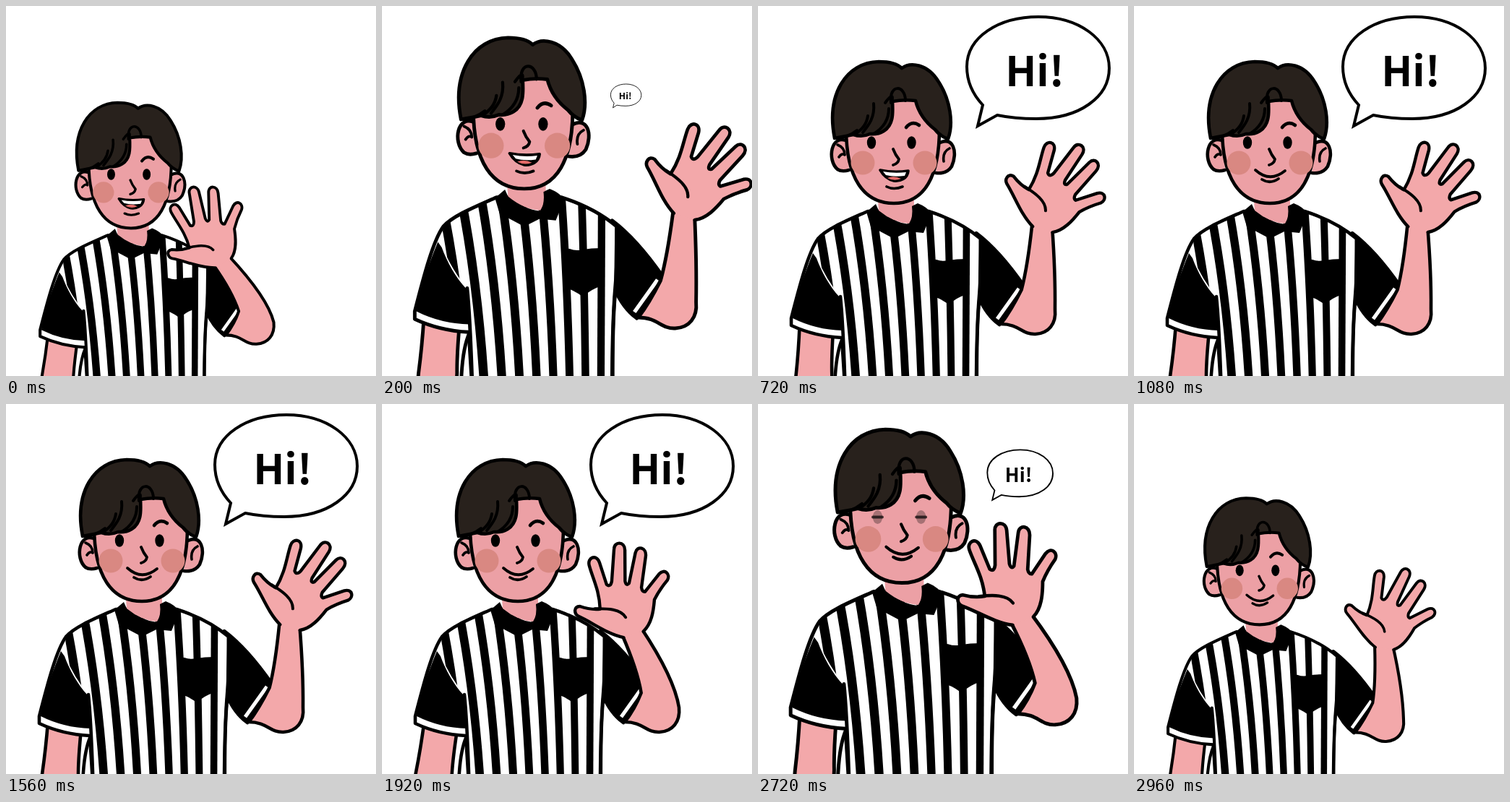
Animation, 512 px wide and 512 px high, one loop 3 s. Source, as an HTML page:

```html
<!DOCTYPE html>
<html lang="en">
<head>
<meta charset="utf-8">
<title>Waving referee</title>
<style>
html, body { margin: 0; width: 100%; height: 100%; overflow: hidden; background: #fff; }
svg { display: block; width: 100vw; height: 100vh; }
.line { fill: none; }
.skin { fill: #f3a8aa; }
.face { fill: #eca0a5; }
.hair { fill: #28211c; }
.white { fill: #fff; }
.ink { fill: #000; }
.bare { stroke: none; }
text { font: 700 57px "Noto Sans CJK KR", "Noto Sans CJK JP", "Noto Sans", sans-serif; text-anchor: middle; }
</style>
</head>
<body>
<svg viewBox="0 0 512 512" stroke="#000" stroke-width="4.6" stroke-linecap="round" stroke-linejoin="round">
  <defs>
    <clipPath id="torso">
      <path d="M152 284C125 296 95 308 83 322L80 345Q95 380 114 402L119 540H304L308 322Q280 300 236 284Z"/>
    </clipPath>
  </defs>
  <g id="man">
    <!-- resting arm -->
    <g id="rest">
      <path class="skin" d="M58 440Q55 478 50 512L45 560H97L100 512Q100 490 104 450Z"/>
    </g>
    <path class="line" d="M117 460Q106 484 106 540"/>

    <!-- shirt -->
    <path class="ink" d="M302 314Q334 338 368 387L334 441Q316 428 305 402Z"/>
    <path class="line" d="M361 391L331 433" stroke="#fff" stroke-width="5" stroke-linecap="butt"/>
    <path class="white" d="M152 284C125 296 95 308 83 322C70 340 58 385 46 432L46 442Q78 457 116 459L121 540H303Q302 440 307 400L308 322Q280 298 236 284Z"/>
    <g id="stripes" class="line" clip-path="url(#torso)" stroke-linecap="butt"></g>
    <path class="line" d="M308 322Q309 370 306 402Q302 450 302 540"/>
    <path class="line" d="M114 402Q118 440 121 540"/>
    <path class="ink bare" d="M76 342C66 366 54 398 48 432Q80 448 117 449Q119 420 113 403C99 388 88 368 81 349Z"/>
    <path class="ink bare" d="M237 350L247 351Q255 354 263 352Q275 350 288 350L286 400Q276 403 264 413Q250 403 239 401Z"/>

    <!-- neck and collar -->
    <path class="face bare" d="M165 255L167 284Q188 300 209 301L216 288V255Z"/>
    <path class="ink bare" d="M150 285L163 274L167 283Q188 300 209 302Q215 292 213 277L221 273Q234 278 240 287L229 314L208 312L188 322L156 305Z"/>

    <!-- head -->
    <path class="face" d="M124 187C101 176 95 213 110 226Q116 230 126 227"/>
    <path class="face" d="M250 190C270 179 277 202 268 222Q261 233 246 231"/>
    <path class="line" d="M110 192Q120 196 120 206M112 209Q116 203 120 206M265 197Q255 202 257 215" stroke-width="3.6"/>
    <path class="face" d="M122 170C122 238 146 273 188 273C231 273 251 235 251 170L220 120H170Z"/>
    <g class="bare" fill="#d98882">
      <circle cx="145" cy="217" r="16.5"/><circle cx="231" cy="217" r="16.5"/>
    </g>
    <path class="hair" d="M106 183C94 122 122 78 167 77Q190 77 199 86C211 77 235 80 250 105C266 130 271 162 263 184Q252 180 245 171Q224 155 218 131Q202 129 186 132C187 150 187 165 174 173Q166 178 155 177Q144 182 132 178Q122 180 106 183Z"/>
    <path class="line" d="M184 134C181 107 204 109 204 131M185 134Q189 116 176 134M160 135C162 154 153 165 145 175M152 152Q150 168 133 178M181 142Q181 164 160 177M107 183Q123 183 137 172" stroke-width="4"/>
    <path class="line" d="M205 168Q213 158 223 165" stroke-width="4.6"/>
    <path class="line" d="M187 198Q190 206 195 212Q194 218 187 220" stroke-width="3.8"/>
    <g id="open" class="ink bare">
      <ellipse cx="157" cy="189" rx="6.2" ry="8.8"/><ellipse cx="212.5" cy="189" rx="6.2" ry="8.8"/>
    </g>
    <path id="shut" class="line" d="M151 189h12M206.5 189h12" stroke-width="3.6"/>
    <path id="smile" class="line" d="M168 227Q188 245 209 228M177 240Q188 247 200 239" stroke-width="3.8"/>
    <g id="talk" stroke-width="3.6">
      <path class="ink" d="M169 227Q188 231 208 228C207 239 197 243 188 242Q176 239 169 227Z"/>
      <path class="white bare" d="M173 229Q188 232 205 230L203 235Q188 237 177 234Z"/>
      <path class="bare" fill="#e56a68" d="M179 238Q188 234 198 239Q188 243 179 238Z"/>
      <path class="line" d="M178 250Q188 255 200 250"/>
    </g>

    <!-- waving arm -->
    <path id="arm" class="skin"/>
    <g id="hand" stroke-width="4.4">
      <path class="skin" d="M350 321C359 309 358 291 356 275Q360 260 368 245C371 236 361 229 355 239L341 267Q337 268 335 262L332 219C331 206 317 206 317 217L317 260Q314 265 311 258L302 216C299 204 285 207 287 218L293 262Q293 271 287 268L271 240C264 229 253 237 258 247C266 263 279 278 285 303Q272 307 257 305C248 307 251 317 258 319C280 324 302 335 325 335"/>
      <path class="line" d="M278 304C295 300 313 297 322 307" stroke-width="4"/>
    </g>

    <!-- speech bubble -->
    <g id="bubble">
      <path class="white" stroke-width="4" stroke-linejoin="miter" d="M331 151Q355 156 385 156C445 156 486 126 486 86C486 46 444 15 388 15C333 15 289 43 289 84C289 105 297 122 311 137L304 166Z"/>
      <text class="bare" x="383" y="111">Hi!</text>
    </g>
  </g>
</svg>
<script>
const LOOP = 3000, CLIP = 900, WAVE = 480;
const el = id => document.getElementById(id);
const set = (id, name, value) => el(id).setAttribute(name, value);
const rad = deg => deg * Math.PI / 180;
const mix = (a, b, k) => a + (b - a) * k;

// Eased passage from a to b between two times
function ease(t, t0, t1, a, b) {
  const k = Math.min(1, Math.max(0, (t - t0) / (t1 - t0)));
  return mix(a, b, (1 - Math.cos(Math.PI * k)) / 2);
}

// Swell past the resting size, then settle
const pop = (t, start, peak, end, from, top) =>
  t < peak ? ease(t, start, peak, from, top) : ease(t, peak, end, top, 1);

const scaleAt = (s, x, y) => `translate(${x} ${y}) scale(${s}) translate(${-x} ${-y})`;
const blink = (t, mid) => Math.max(0, 1 - Math.abs(t - mid) / 100);

let stripes = "";
for (let i = 0; i < 9; i++) {
  const top = 79 + 26.2 * i, foot = 113 + 24.2 * i - 0.3 * i * i;
  stripes += `<path stroke-width="${12 - 0.3 * i}" d="M${top} 280Q${mix(top, foot, 0.75)} 400 ${foot} 540"/>`;
}
el("stripes").innerHTML = stripes;

function drawArm(u) {
  const a = rad(-30 + 35 * u), len = 110 + 6 * u;
  const dx = Math.sin(a), dy = -Math.cos(a);
  const x = 385 + len * dx, y = 425 + len * dy;
  // The forearm's end is tucked under the palm
  const side = w => `${x + 5 * dx - w * dy} ${y + 5 * dy + w * dx}`;
  set("arm", "d", `M${side(-14)}Q${mix(345, 374, u)} ${mix(372, 360, u)} ${mix(356, 365, u)} ${mix(403, 392, u)}` +
    `Q350 422 336 440C362 440 365 455 384 454C402 453 413 440 411 420` +
    `Q${mix(401, 412, u)} ${mix(382, 370, u)} ${side(14)}`);
  set("hand", "transform", `translate(${x} ${y}) rotate(${-3 + 50 * u}) translate(-337 -329)`);
}

function draw(t) {
  const edge = Math.min(t, LOOP - t); // the exit mirrors the entrance
  set("man", "transform", scaleAt(pop(edge, 10, 255, 400, 0.886, 1.09), 56, 575));
  set("bubble", "transform", scaleAt(pop(edge, 50, 580, 720, 0, 1.078), 303, 168));
  el("bubble").style.display = edge > 50 ? "" : "none";

  const phase = 2 * Math.PI * (t < CLIP ? t : t - CLIP) / WAVE + 0.35;
  drawArm((1 - Math.cos(phase)) / 2);
  set("rest", "transform", `rotate(${3 * Math.sin(phase + 0.43)} 80 450)`);

  const shut = blink(t, 1320) + blink(t, 2750);
  set("open", "opacity", 1 - shut);
  set("shut", "opacity", shut);
  el("talk").style.display = t < CLIP ? "" : "none";
  el("smile").style.display = t < CLIP ? "none" : "";
}

const start = performance.now();
function tick() {
  draw((performance.now() - start) % LOOP);
  requestAnimationFrame(tick);
}
tick();
</script>
</body>
</html>
```
